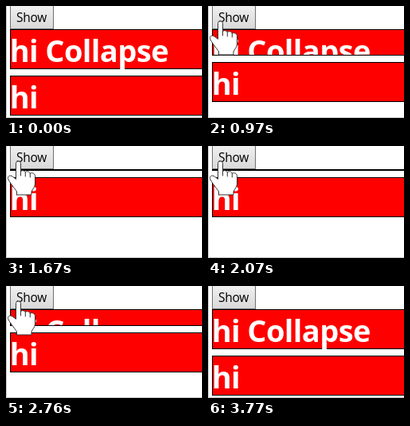
Write an HTML page that moves like this. It is 246 px wide and 140 px high and loops after 4320 ms.

```html
<!DOCTYPE html>
<html lang="en">
<head>
<meta charset="utf-8">
<title>Collapse toggle</title>
<style>
  html, body { margin: 0; height: 100%; overflow: hidden; background: #fff; }
  svg { display: block; width: 100vw; height: 100vh; }
  .box { fill: #f00; stroke: #000; }
  .big { font: 700 38px "Open Sans", "Noto Sans", sans-serif; letter-spacing: -.6px; fill: #fff; }
  .label { font: 15.5px "Open Sans", "Noto Sans", sans-serif; letter-spacing: -.3px; fill: #000; }
</style>
</head>
<body>
<svg viewBox="0 0 246 140">
  <defs>
    <linearGradient id="face" x2="0" y2="1">
      <stop offset="0" stop-color="#f3f3f3"/>
      <stop offset="1" stop-color="#d9d9d9"/>
    </linearGradient>
    <linearGradient id="pressed" x2="0" y2="1">
      <stop offset="0" stop-color="#e4e4e4"/>
      <stop offset="1" stop-color="#f6f6f6"/>
    </linearGradient>
    <clipPath id="clip"><rect id="window" x="6" y="30" width="240"/></clipPath>
  </defs>
  <path d="M.5 0V139.500H246" fill="none" stroke="#c8c8c8"/>
  <rect id="button" x="5.5" y="-4.5" width="54" height="33" stroke="#707070"/>
  <text class="label" x="13" y="20">Show</text>

  <rect id="panel" class="box" x="5.5" y="29.5" width="260"/>
  <g clip-path="url(#clip)"><text class="big" x="4.7" y="69.5">hi Collapse</text></g>

  <g id="below">
    <rect class="box" x="5.5" y=".5" width="260" height="49"/>
    <text class="big" x="4.7" y="40.5">hi</text>
  </g>

  <g id="hand" stroke="#333" stroke-linejoin="round" stroke-linecap="round">
    <path fill="#fff" d="M12.500 41V21.500Q12.500 19 15.500 19T18.500 21.500V32C19 30 24 30.500 24.300 33
      C25 31 30 31.500 30.300 34.500C31 33 36.500 33.500 36.500 37.500V47C36.500 52 33 54 32 57V61H13.500V57
      C11 53 7 49 3 42C1 38 5 35.500 8 38Z"/>
    <path fill="none" d="M18.500 32V37M24.300 33V38M30.300 34.500V39"/>
  </g>
</svg>
<script>
  const LOOP = 4320, OPEN = 50, SHUT = 2;
  const $ = id => document.getElementById(id);
  const [win, button, panel, below, hand] = ["window", "button", "panel", "below", "hand"].map($);

  // Screen updates: first time, last time, number of updates
  const updates = [
    [120, 590, 7], [660, 1130, 7], [1210, 1670, 7], [2070, 2070, 1],
    [2300, 2300, 1], [2450, 2910, 7], [2990, 3460, 7], [3600, 3770, 3]
  ];
  const ticks = updates.flatMap(([a, b, n]) =>
    Array.from({ length: n }, (_, i) => Math.round((a + (b - a) * i / Math.max(1, n - 1)) / 10) * 10));
  const snap = t => ticks.reduce((last, tick) => tick <= t ? tick : last, 0);

  const clamp = v => Math.min(1, Math.max(0, v));
  const mix = (a, b, k) => a + (b - a) * k;

  function bezier(x1, y1, x2, y2) {
    const at = (a, b, s) => 3 * a * s * (1 - s) ** 2 + 3 * b * s * s * (1 - s) + s ** 3;
    return x => {
      let lo = 0, hi = 1;
      for (let i = 0; i < 24; i++) {
        const s = (lo + hi) / 2;
        if (at(x1, x2, s) < x) lo = s; else hi = s;
      }
      return at(y1, y2, (lo + hi) / 2);
    };
  }
  const closing = bezier(.25, .1, .47, .95);
  const opening = bezier(.25, .1, .25, 1);

  function panelHeight(t) {
    if (t < 2450) return mix(OPEN, SHUT, closing(clamp((t - 700) / 940)));
    return mix(SHUT, OPEN, opening(clamp((t - 2450) / 1260)));
  }

  const isPressed = t => t === 660 || t === 2300;

  function handOffset(t) {
    if (t < 120 || t >= 3770) return null;
    if (t < 3600) {
      const left = (1 - clamp((t - 120) / 470)) ** 2;
      return [57 * left, 25 * left];
    }
    const k = (t - 3520) / 80;
    return [45 * k * k, 28 * k * k];
  }

  function draw(time) {
    const t = snap(time % LOOP);
    const h = Math.round(panelHeight(t));
    button.setAttribute("fill", `url(#${isPressed(t) ? "pressed" : "face"})`);
    panel.setAttribute("height", h - 1);
    win.setAttribute("height", h < OPEN - 1 ? h - 2 : OPEN + 10);
    below.setAttribute("transform", `translate(0 ${37 + h})`);
    const at = handOffset(t);
    hand.style.display = at ? "" : "none";
    if (at) hand.setAttribute("transform", `translate(${at})`);
  }

  const start = performance.now();
  function frame() {
    draw(performance.now() - start);
    requestAnimationFrame(frame);
  }
  frame();
</script>
</body>
</html>
```
